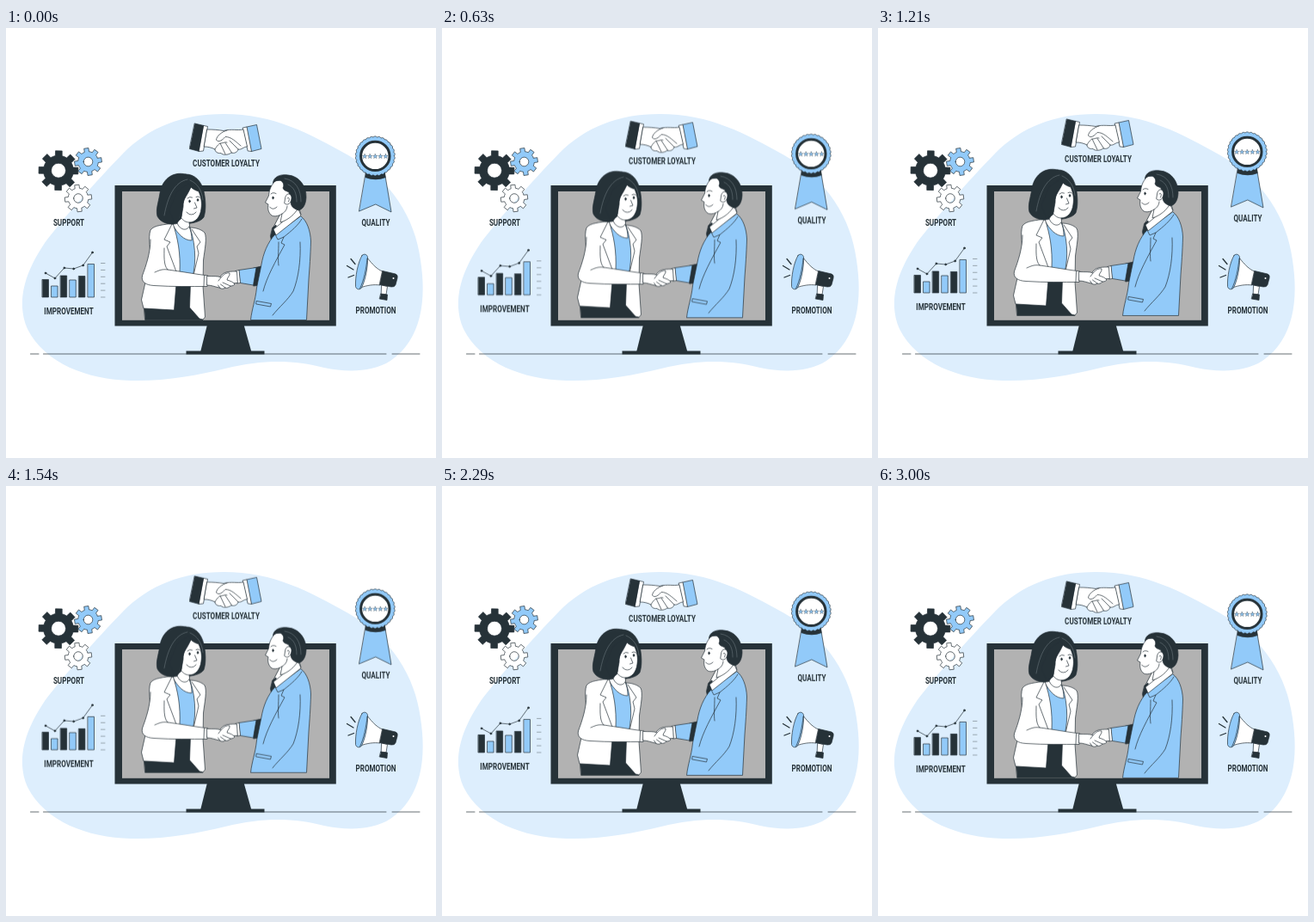
An HTML page that plays this animation: 500x500 px, repeating every 3.04 s.

```html
<!DOCTYPE html>
<html lang="en">
<head>
<meta charset="utf-8">
<title>Customer loyalty</title>
<style>
  html, body { margin: 0; width: 100%; height: 100%; overflow: hidden; background: #fff; }
  svg { display: block; width: 100vw; height: 100vh; }
  .ink { fill: #263238; }
  .blue { fill: #92caf9; }
  .white { fill: #fff; }
  .none { fill: none; }
  .line { stroke: #263238; stroke-width: .7; stroke-linecap: round; stroke-linejoin: round; }
  .soft { fill: none; stroke: #78858b; stroke-width: .5; }
  /* one condensed face shared by every label */
  text {
    font: 700 11px Roboto, "Liberation Sans", sans-serif;
    text-anchor: middle; fill: #263238; transform: scaleX(.735);
  }
  .float { animation: float 3040ms linear infinite; }
  @keyframes float { 50% { transform: translateY(-6.4px); } }
</style>
</head>
<body>
<svg viewBox="0 0 500 500">
  <path fill="#ddeefd" d="M253 100C312 100 353 123 398 148C448 176 476 222 482 270C489 315 484 362 447 387C425 401 395 400 370 395C335 386 300 385 255 396C222 404 185 411 145 410C95 409 45 390 25 350C10 315 25 280 45 250C66 222 103 180 136 146C167 115 205 100 253 100Z"/>
  <path class="none line" d="M28.500 379H38M43.500 379H442M449 379H481"/>

  <!-- monitor -->
  <g class="ink">
    <path d="M234 345H276.500L285.500 377H226Z"/>
    <rect x="209.500" y="375.500" width="91" height="4"/>
    <rect x="126.500" y="183" width="257.300" height="163.500"/>
  </g>
  <rect x="135" y="190" width="241" height="149.800" fill="#b2b2b2"/>

  <!-- support -->
  <g id="gears"></g>
  <g transform="translate(73 230)"><text>SUPPORT</text></g>

  <!-- promotion -->
  <g class="line">
    <path class="none" stroke-width="1.300" d="M401 268.500L406 274.500M396.500 276.500L404 281M398 290L404.500 287.500"/>
    <path class="white" d="M437 299L443.500 300.500L442 310H436.500Z"/>
    <path class="ink" d="M436 309L443.500 310L443 316.500L434.500 315Z"/>
    <path class="white" d="M420 267C426 275 432 281 438 283L435 299C428 298 420 299 412 302Z"/>
    <path class="ink" d="M438 282.500L453 286Q456 287 455 291L453 298.500Q452 301.500 448 301L434.500 298.500Z"/>
    <path class="blue" d="M414 264.500C416 262 420 263 420.500 266.500C421 277 418 293 413.500 302C411.500 305 407 304 406.500 300.500C406 289 409 273 414 264.500Z"/>
    <path class="none" d="M420 268C419 280 416 294 411.500 303"/>
  </g>
  <circle class="white" cx="450.500" cy="291" r="1"/>
  <g transform="translate(430 332.400)"><text>PROMOTION</text></g>

  <!-- customer loyalty -->
  <g class="float">
    <g class="line">
      <path class="ink" d="M219.500 111L230 113.500L224.500 143.500L213.500 140.500Z"/>
      <path class="white" d="M230 113.500L234.500 114.500L229.500 143L224.500 143.500Z"/>
      <path class="blue" d="M280 115L291.500 112.500L297 140.500L285.500 143.500Z"/>
      <path class="white" d="M275.500 116L280 115L285.500 143.500L281.500 143Z"/>
      <path class="white" d="M234 118C241 118 247 118.500 253 119.500C262 117 269 119.500 276 118L280.500 138C276 138 274 142 270 141C269 145 265 146 262 145C258 148 252 148 250 145.500C246 146 243 144 243 141C239 139 235 138 230.500 138Z"/>
      <path class="none" d="M257 119C250 121 245 126 244.500 130C247 134 252 130 255 126.500C262 126.500 267 132 273 137M260 131L270 141M255 133.500L262.500 145M249 134L255 146.500M243 141C245 137 248 134 250 134S255 132 257 133"/>
    </g>
    <g transform="translate(256 160.800)"><text>CUSTOMER LOYALTY</text></g>
  </g>

  <!-- quality -->
  <g class="float">
    <path class="blue line" d="M419 166H440L448 214L429.800 205L410.800 213Z"/>
    <path class="ink" d="M418.500 167H440.500L441.500 174Q430 178.500 417.700 174Z"/>
    <path id="seal" class="blue line"/>
    <circle class="white" cx="429.300" cy="148.900" r="16.700" stroke="#263238" stroke-width="3"/>
    <g id="stars" class="blue line" style="stroke-width:.35"></g>
    <g transform="translate(430 230)"><text>QUALITY</text></g>
  </g>

  <!-- improvement -->
  <g class="float">
    <g id="chart" class="line"></g>
    <g transform="translate(73 332.800)"><text>IMPROVEMENT</text></g>
  </g>

  <!-- people -->
  <g class="float line">
    <!-- man: far sleeve and hand -->
    <path class="ink" d="M288 279L297 277L295.500 299L288 300Z"/>
    <path class="blue" d="M271 281.500L291 278.500L287.500 299L272.500 296.500Z"/>
    <path class="white" d="M267 282.500L271 281.500L272.500 296.500L269 297Z"/>

    <!-- woman: skirt, top, jacket -->
    <path class="ink" d="M160 318L196 296H216L229 339.500H162Z"/>
    <path class="blue" d="M196 230L218 233C222 248 223 270 220 288L215 297L199 297Z"/>
    <path class="white" d="M195 218L213 219L213 231C215 236 216 240 216 247C207 247 200 240 194 229Z"/>
    <path class="white" d="M214 232C220 232 227 234 231 238C234 244 231 258 229.500 270L229 300L231.500 336L229 339L225 338L213.500 325L214.500 297C221 280 222 256 214 232Z"/>
    <path class="none" d="M216 234L226 249L222 254L224 262L216 296"/>
    <path class="white" d="M194 227C184 229 172 229 168 235C165 244 168 259 168.500 267L157.500 316L160 326L195.500 328L198 297L202 284C203 262 200 245 194 227Z"/>
    <path class="none" d="M193 228L184 246L191 249L187 254L199 286"/>
    <path class="white" d="M168 246C168 261 163 276 158.500 288C157 295 162 299 172 299.500C194 301 215 300.500 234 300.500L235 288C219 286 203 283 188 281C183 276 184 264 184 256"/>
    <path class="none" d="M188 281C181 280 178 282 173 284M230.500 288L230 300"/>

    <!-- handshake -->
    <path class="white" d="M268 283C261 283 255 283 251 287L246 292L248 295L255 293L260 297L269 296.500Z"/>
    <path class="white" d="M234 288.500C241 289 246 288 250 290C253 287 256 284 260 285C261 288 257 290 257 293C261 294 265 296 266 298C264 300 262 300 261 300C259 302 257 303 255 302C252 304 250 303 248 302C243 301 239 299 234 299Z"/>
    <path class="none" d="M250 290L247 294M252 296L261 300M249.500 298L255 302M246.500 299L249 302.500"/>

    <!-- woman: head -->
    <path class="ink" d="M209 170C192 166 181 178 179 192C177 204 174 211 176 219C180 227 192 230 200 227C212 229 226 226 230 220C233 211 232 199 230 190C227 177 219 170 209 170Z"/>
    <path class="white" d="M215 185C212 192 209 196 207 200C204 207 204 213 204 219L199 227C203 236 211 236 213.500 230L213 226C221 226 226 219 227 210C228 203 227 197 224 190C221 189 218 188 215 185Z"/>
    <path class="none" d="M203 220C206 224 209 226 213 226M219.500 203L222 209L218.500 210M210 214C213 218 218 218 221 214M211 198Q213.500 195.500 216.500 197M221 196.500Q223.500 195 225.500 197"/>
    <path class="ink" d="M215 185C210 191 206 198 206 208L203.500 222L196 227L190 212L199 190L212 181Z"/>
    <ellipse class="ink" cx="213.500" cy="201.500" rx=".8" ry="1.400"/>
    <ellipse class="ink" cx="223" cy="200" rx=".8" ry="1.400"/>
    <path class="soft" d="M211 176C196 179 188 196 184 218M214 177C223 181 228 189 229 200"/>

    <!-- man: suit -->
    <path class="white" d="M322 211L340 207L343 217L313 244L310 234Z"/>
    <path class="ink" d="M310 232L314 229L315 237L309 250L307.500 242Z"/>
    <path class="blue" d="M343 219C350 224 354 236 354.500 248C354 265 353 279 352 292L349.500 339.500H284.500C286 326 290 317 291.500 302L297 275C299 263 304 249 313 240Z"/>
    <path class="white" d="M339 208L343 218L314 241L311 234C320 227 330 219 339 208Z"/>
    <path class="none" d="M313 240L316 246L323 243L320 250L324 252C313 272 303 290 299 306M344 222C340 229 332 236 323 243M317 249C317 259 316 270 317 276M342 249C343 270 340 291 334 306C328 316 318 324 310 334M291.500 317.500L308.500 320.500L307.500 324L291 321Z"/>

    <!-- man: head -->
    <path class="white" d="M313 178C307 184 306 190 305.500 195L301.500 203L305 205C304 210 305 215 309 218C313 220 318 218 321 216L319 226C329 223 336 216 340 209L340 188L326 177Z"/>
    <path class="ink" d="M310.500 180C311 173 319 169.500 328 171C341 172 349.500 184 349 197C348.500 206 345 211 340 212C334 210 331 207 331 202L329 191C325 189 323 189 322 186C324 182 322 179 319 177C315 176.500 313 178 310.500 180Z"/>
    <path class="white" d="M325 196C327 190.500 332.500 193 332 198C331.500 204 327.500 207 324 204Z"/>
    <path class="none" d="M327 198C329.500 196 330 199 328.500 202M306.500 208C309 211 312 211 315 208M308 193Q310 190.500 314 192.500M321 216C325 214 327 210 327 207"/>
    <ellipse class="ink" cx="310.500" cy="197.500" rx=".8" ry="1.400"/>
    <path class="soft" d="M324 175C337 177 343 188 343 202M328 182C335 185 338 192 338 202"/>
  </g>
</svg>

<script>
  const $ = id => document.getElementById(id);

  function add(parent, name, attrs) {
    const el = document.createElementNS("http://www.w3.org/2000/svg", name);
    for (const key in attrs) el.setAttribute(key, attrs[key]);
    $(parent).append(el);
  }

  // closed outline through polar points [angle in degrees, radius]
  const polar = (cx, cy, points) => "M" + points.map(([a, r]) => {
    const t = a * Math.PI / 180;
    return (cx + r * Math.cos(t)).toFixed(2) + " " + (cy + r * Math.sin(t)).toFixed(2);
  }).join("L") + "Z";

  const ring = (count, turn, shape) =>
    Array.from({ length: count }, (_, i) =>
      shape.map(([a, r]) => [a + turn + i * 360 / count, r])).flat();

  function gear(cx, cy, outer, root, hole, turn, fill) {
    const teeth = ring(8, turn, [[-13, root], [-9.5, outer], [9.5, outer], [13, root], [22.5, root]]);
    const h = `M${cx - hole} ${cy}a${hole} ${hole} 0 1 0 ${2 * hole} 0a${hole} ${hole} 0 1 0 ${-2 * hole} 0Z`;
    add("gears", "path", { d: polar(cx, cy, teeth) + h, class: fill + " line", "fill-rule": "evenodd" });
  }
  gear(61, 165.7, 23.2, 17.5, 8.5, 1, "ink");
  gear(95.5, 155.5, 16, 11.8, 5.3, -8, "blue");
  gear(84, 198, 15.8, 11.8, 5.3, -6, "white");

  const scallops = Array.from({ length: 180 }, (_, i) => [i * 2, 22 + Math.abs(Math.sin(i * Math.PI / 6))]);
  $("seal").setAttribute("d", polar(429.3, 148.9, scallops));

  for (let i = 0; i < 5; i++)
    add("stars", "path", { d: polar(417.1 + i * 6.1, 149.3, ring(5, -90, [[0, 2.8], [36, 1.2]])) });

  const tops = [292.5, 300, 288, 293, 288.5, 274.5];
  tops.forEach((y, i) => {
    add("chart", "rect", { x: 42.3 + i * 10.6, y, width: 7.2, height: 313 - y, class: i % 2 ? "blue" : "ink" });
    add("chart", "path", { d: `M110.500 ${273.5 + i * 7.9}h4.500`, style: "stroke:#78858b" });
  });

  const trend = [285, 291, 279, 280, 276, 261];
  const at = i => 46 + i * 10.9;
  add("chart", "polyline", { points: trend.map((y, i) => [at(i), y]).join(" "), class: "none" });
  trend.forEach((cy, i) => add("chart", "circle", { cx: at(i), cy, r: 1, class: "ink" }));
</script>
</body>
</html>
```
